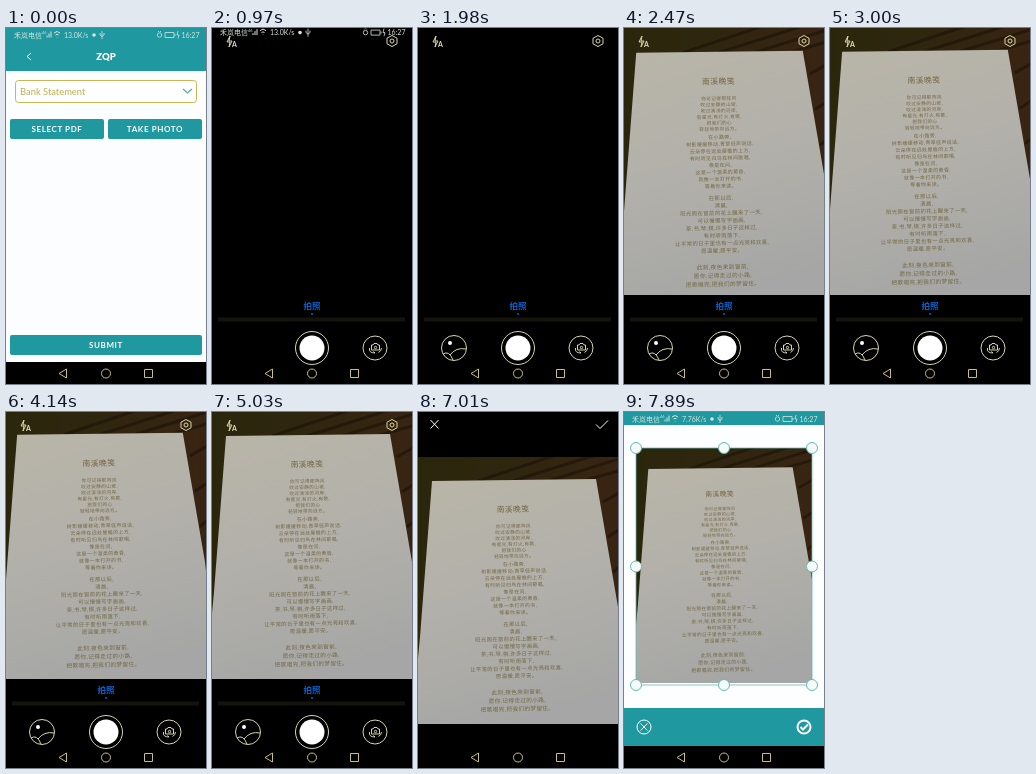
Animation of 200x356 px, one loop 8 s. Source, as an HTML page:

```html
<!DOCTYPE html>
<html lang="zh">
<head>
<meta charset="utf-8">
<title>Document capture</title>
<style>
html, body { margin: 0; width: 100%; height: 100%; overflow: hidden; background: #000; }
svg { display: block; width: 200px; height: 356px; }
text { font-family: Lato, 'Noto Sans CJK SC', 'Noto Sans CJK JP', sans-serif; }
.mid { text-anchor: middle; }
.label { font-size: 8px; font-weight: 700; letter-spacing: .6px; fill: #fff; text-anchor: middle; }
.teal { fill: #2098a0; }
.line { fill: none; stroke: #d8d6a8; stroke-width: 1; }
.white { fill: none; stroke: #fff; stroke-width: 1; }
.bold { stroke-width: 2; }
.nav { fill: none; stroke: #cbbf7c; }
#status text { font-size: 7px; fill: #d5e6dc; }
#poem text { text-anchor: middle; letter-spacing: .4px; fill: #736740; }
</style>
</head>
<body>
<svg viewBox="0 0 200 356">
  <defs>
    <linearGradient id="wood">
      <stop stop-color="#29260c"/><stop offset=".5" stop-color="#30260f"/><stop offset="1" stop-color="#3a2413"/>
    </linearGradient>
    <linearGradient id="sheet" x2=".25" y2="1">
      <stop stop-color="#b9b5a8"/><stop offset=".5" stop-color="#b2b0aa"/><stop offset="1" stop-color="#a5a6a5"/>
    </linearGradient>
    <clipPath id="view"><path d="M0 0H200V267H0z"/></clipPath>
    <clipPath id="takeShape"><rect x="102" y="91" width="94" height="20" rx="2"/></clipPath>
    <marker id="handle" markerUnits="userSpaceOnUse" markerWidth="14" markerHeight="14" refX="7" refY="7">
      <circle cx="7" cy="7" r="5.5" fill="#f4faf8" stroke="#65b9b5"/>
    </marker>
  </defs>

  <path d="M0 0H200V356H0z"/>
  <g id="form">
    <path fill="#fcfdff" d="M0 0H200V334H0z"/>
    <path class="teal" d="M0 0H200V43H0z"/>
    <path class="white" d="M25 25l-4 3.5 4 3.5"/>
    <text class="mid" x="100" y="32" font-size="9.5" font-weight="900" fill="#fff">ZQP</text>
    <rect x="9.5" y="52.5" width="181" height="22" rx="3" fill="#fff" stroke="#c9b755"/>
    <text x="14" y="67" font-size="9.4" fill="#bcae50">Bank Statement</text>
    <path d="M177 61l4.5 4 4.5-4" fill="none" stroke="#4fb3a8" stroke-width="1.3"/>
    <rect class="teal" x="4" y="91" width="94" height="20" rx="2"/>
    <rect class="teal" x="102" y="91" width="94" height="20" rx="2"/>
    <circle id="ripple" cx="149" cy="101" fill="#fff" clip-path="url(#takeShape)"/>
    <rect class="teal" x="4" y="307" width="192" height="20" rx="2"/>
    <text class="label" x="51" y="104">SELECT PDF</text>
    <text class="label" x="149" y="104">TAKE PHOTO</text>
    <text class="label" x="100" y="320">SUBMIT</text>
  </g>

  <g id="camera">
    <path d="M0 0H200V334H0z"/>
    <g id="preview">
      <g id="photo" clip-path="url(#view)">
        <g id="scene">
          <path fill="url(#wood)" d="M-20-20H220V290H-20z"/>
          <path d="M60 24L150-6M95 24L190-6M130 24L220-4M165 24L220 8M185 45L220 25M190 80L220 60M195 115L220 95" fill="none" stroke="#150f07" stroke-width="3" opacity=".5"/>
          <path fill="url(#sheet)" d="M14 24L178 22 200 150 215 285H-8L2 180z"/>
          <g id="poem" transform="rotate(-1.3 95 52)"/>
        </g>
      </g>
    </g>
    <g id="controls">
      <path class="line" d="M18 8l-3 6h3l-1 5 3-6h-3z"/>
      <text x="20" y="19" font-size="7" font-weight="700" fill="#e5e3bc">A</text>
      <path class="line" d="M180 7.5l5 2.7v5.600L180 18.500l-5-2.700v-5.600z" stroke-linejoin="round"/>
      <circle class="line" cx="180" cy="13" r="2"/>
      <text class="mid" x="100" y="281" font-size="8.5" font-weight="700" fill="#0b60c8">拍照</text>
      <circle cx="100" cy="286" r="1" fill="#0b60c8"/>
      <path d="M6 291.500H193" stroke="#14140c" stroke-width="4"/>
      <g id="gallery">
        <circle class="line" cx="36" cy="320" r="12.5"/>
        <circle cx="32" cy="315" r="2" fill="#fff"/>
        <path class="line" d="M25 326Q31 322 35 332M32 327Q38 319 48 321"/>
      </g>
      <circle class="line" cx="100" cy="320" r="16.5"/>
      <circle id="shutter" cx="100" cy="320" r="12.5" fill="#fff"/>
      <circle class="line" cx="163" cy="320" r="12"/>
      <path class="line" d="M159.500 317h1.500l1-1.500h3l1 1.500h1.500v5h-8zM157.500 320q-1 5 5.500 5l-1.500-1.500M169.500 320q0 3-3 4.500"/>
      <circle class="line" cx="163.500" cy="319.500" r="1.200"/>
    </g>
    <g id="review">
      <path class="white" d="M12.500 8l8 8.500M20.500 8l-8 8.500M178 12.500l4 4 8-8"/>
    </g>
  </g>

  <g id="crop">
    <path fill="#fdfeff" d="M0 0H200V334H0z"/>
    <path class="teal" d="M0 0H200V13H0zM0 296H200V334H0z"/>
    <use href="#photo" transform="translate(12 36) scale(.88)"/>
    <path fill="none" stroke="#65b9b5" stroke-width=".8" d="M12 36H100H188V154.5V273H100H12V154.5z" marker-start="url(#handle)" marker-mid="url(#handle)"/>
    <circle class="white" cx="20" cy="315" r="7"/>
    <path class="white" d="M16.500 311.500l7 7M23.500 311.500l-7 7"/>
    <circle class="white bold" cx="180" cy="315" r="6.5"/>
    <path class="white bold" d="M176.500 315l2.500 2.500 5-5"/>
  </g>

  <g id="status">
    <text x="8" y="9.5">禾岚电信</text>
    <text x="36" y="6" style="font-size:4px">46</text>
    <path d="M41 9.500v-2M43 9.500v-4M45 9.500v-6" stroke="#d5e6dc"/>
    <path d="M48 5q3-3 6 0M49.500 7q1.500-1.500 3 0M51 9v.5" fill="none" stroke="#d5e6dc"/>
    <text id="speed" x="58" y="9.5"></text>
    <circle cx="88" cy="7" r="1.8" fill="#d5e6dc"/>
    <path d="M96 3v8M94 5v2l2 1.500 2-1.500v-2M152 4l1-1M155 4l-1-1" fill="none" stroke="#d5e6dc" stroke-width=".8"/>
    <circle cx="153.5" cy="7" r="2.2" fill="none" stroke="#d5e6dc" stroke-width=".8"/>
    <path d="M159 4.500h9v5h-9zM169 6v2M172 3l-1 4h2l-1 3.500" fill="none" stroke="#d5e6dc" stroke-width=".8"/>
    <text x="175.5" y="9.5">16:27</text>
  </g>

  <path class="nav" d="M60.500 341v9l-7.500-4.500zM138.500 341.500h8v8h-8z"/>
  <circle class="nav" cx="100" cy="345.5" r="4.5"/>
</svg>
<script>
const LOOP = 8000;
const $ = id => document.getElementById(id);
const set = (id, attrs) => Object.entries(attrs).forEach(([k, v]) => $(id).setAttribute(k, v));
const fade = (id, v) => set(id, { opacity: v, visibility: v > 0 ? 'visible' : 'hidden' });
const ramp = (t, a, b) => Math.min(1, Math.max(0, (t - a) / (b - a)));
const easeOut = p => 1 - (1 - p) ** 3;
const smooth = p => p * p * (3 - 2 * p);

// Each stanza: first line centre, line step, type size, lines.
const stanzas = [
  [69, 6, 4.6, ['你可记得那阵风', '吹过安静的山坡,', '吹过清浅的河岸,', '有星光,有灯火,有歌,', '把我们的心', '轻轻地带向远方。']],
  [107, 6.9, 4.9, ['在小路旁,', '树影缓缓移动,青草低声说话,', '云朵停在远处屋檐的上方,', '有时听见归鸟在林间歌唱,', '像是在问,', '这是一个温柔的黄昏,', '就像一本打开的书,', '等着你来读。']],
  [167, 7.4, 5.3, ['在那以后,', '清晨,', '阳光照在窗前的花上醒来了一天,', '可以慢慢写字画画,', '茶,书,琴,棋,许多日子这样过,', '有时听雨落下,', '让平常的日子里也有一点光亮和欢喜,', '愿温暖,愿平安。']],
  [235, 8.4, 5.6, ['此刻,夜色来到窗前,', '愿你,记得走过的小路,', '把歌唱完,把我们的梦留住。']]
];
const addLine = (text, y, size) => `<text x="95" y="${y + size * .38}" font-size="${size}">${text}</text>`;
$('poem').innerHTML = addLine('南溪晚笺', 52, 7.8) +
  stanzas.map(([y, step, size, lines]) => lines.map((s, i) => addLine(s, y + i * step, size)).join('')).join('');

// Hand-held drift: time, x, y, scale.
const drift = [[2000, 0, 2, 1.02], [3000, -1, 0, 1.01], [4140, -2, -1, 1.01], [5030, 0, 0, 1], [LOOP, 0, 0, 1]];
function pose(t) {
  const i = Math.max(1, drift.findIndex(d => d[0] > t));
  const [a, b] = [drift[i - 1], drift[i]];
  const p = smooth(ramp(t, a[0], b[0]));
  return a.map((v, k) => v + (b[k] - v) * p);
}

function draw(t) {
  const cropIn = ramp(t, 7410, 7650);

  const press = ramp(t, 440, 720);
  set('ripple', { r: 50 * easeOut(press), opacity: press > 0 ? .35 * (1 - press) : 0 });
  fade('form', t < 950 ? 1 : 0);
  fade('camera', ramp(t, 700, 900));
  fade('gallery', ramp(t, 1600, 1670));

  const [, x, y, s] = pose(t);
  set('scene', { transform: `translate(${100 + x} ${52 + y}) scale(${s}) translate(-100 -52)` });
  fade('photo', ramp(t, 2020, 2350));

  const slide = easeOut(ramp(t, 5250, 5600));
  set('preview', { transform: `translate(0 ${45 * slide})` });
  set('shutter', { r: 12.5 - 2 * ramp(t, 5080, 5160) });
  fade('controls', t < 5250 ? 1 : 0);
  fade('review', ramp(t, 5400, 5600));
  fade('crop', cropIn);

  const leaving = t < 2000 ? ramp(t, 900, 1280) : 0;
  set('status', { transform: `translate(0 ${-13 * leaving})` });
  fade('status', t < 1280 ? 1 : cropIn);
  $('speed').textContent = t < 2000 ? '13.0K/s' : '7.76K/s';
}

let start;
function frame(now) {
  start ??= now;
  draw((now - start) % LOOP);
  requestAnimationFrame(frame);
}
draw(0);
requestAnimationFrame(frame);
</script>
</body>
</html>
```
